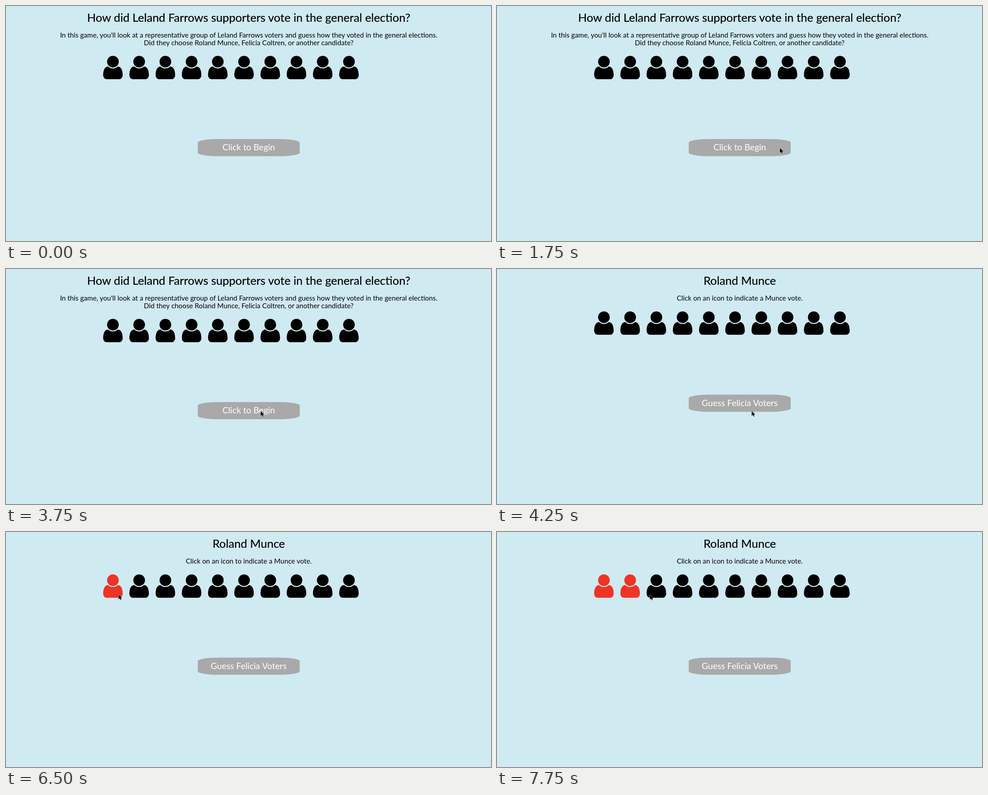
Animation, 1075 px wide and 521 px high, one loop 8 s. Source, as an HTML page:

```html
<!DOCTYPE html>
<html lang="en">
<head>
<meta charset="utf-8">
<title>Voter guessing game</title>
<style>
html, body { margin: 0; width: 100%; height: 100%; overflow: hidden; background: #d0eaf1; }
svg { display: block; width: 1075px; height: 521px; }
text { font-family: Lato, "Open Sans", sans-serif; text-anchor: middle; }
.title { font-size: 25.5px; stroke: #000; stroke-width: .2px; }
.body { font-size: 15.3px; }
.label { font-size: 19.3px; fill: #fff; }
</style>
</head>
<body>
<svg viewBox="0 0 1075 521">
  <defs>
    <g id="person">
      <circle cy="12.9" r="12.9"/>
      <path d="M-10.6 23.7Q-6.1 28 0 28T10.6 23.7C19.2 23.7 21.6 34.1 21.6 42.8C21.6 47.6 18.3 51.8 14.4 51.8H-14.4C-18.3 51.8-21.6 47.6-21.6 42.8C-21.6 34.1-19.2 23.7-10.6 23.7Z"/>
    </g>
  </defs>
  <text id="title" class="title" x="538" y="35.3"></text>
  <text id="line1" class="body" x="538" y="70"></text>
  <text id="line2" class="body" x="538" y="86.5"></text>
  <g id="lower">
    <g id="people"></g>
    <rect x="425" y="295" width="226" height="38" rx="45.2" ry="7.6" fill="#a9a9a9"/>
    <text id="label" class="label" x="538" y="320.3"></text>
  </g>
  <path id="cursor" d="M0 0V11L2.6 8.6L4.4 12.6L6.2 11.8L4.5 8H8Z" stroke="#fff" stroke-width="1" paint-order="stroke"/>
</svg>
<script>
const LOOP = 8000;
const STEP = 250;
const PEOPLE = 10;
const el = id => document.getElementById(id);

const intro = {
  shift: 0,
  title: "How did Leland Farrows supporters vote in the general election?",
  line1: "In this game, you'll look at a representative group of Leland Farrows voters and guess how they voted in the general elections.",
  line2: "Did they choose Roland Munce, Felicia Coltren, or another candidate?",
  label: "Click to Begin"
};
const guess = {
  shift: -16.5,
  title: "Roland Munce",
  line1: "Click on an icon to indicate a Munce vote.",
  line2: "",
  label: "Guess Felicia Voters"
};
const guessStart = 4250;
const firstClick = 6500;
const clickGap = 750;
const clickCount = 2;

// The pointer enters, then glides to each place and rests there.
const entry = { at: 500, x: 980, y: 17 };
const moves = [
  { from: 500, to: 750, x: 948, y: 124 },
  { from: 750, to: 1250, x: 707, y: 263 },
  { from: 1250, to: 1750, x: 627, y: 314.7 },
  { from: 2250, to: 2750, x: 564.5, y: 314.7 },
  { from: 5250, to: 5500, x: 363, y: 214.3 },
  { from: 5750, to: 6250, x: 249.5, y: 138.5 },
  { from: 6750, to: 7000, x: 290, y: 138.5 },
  { from: 7250, to: 7750, x: 339, y: 139 }
];

const easeOut = p => 1 - (1 - p) ** 3.5;

function pointerAt(t) {
  let { x, y } = entry;
  for (const move of moves) {
    const p = (t - move.from) / (move.to - move.from);
    const k = easeOut(Math.min(1, Math.max(0, p)));
    x += (move.x - x) * k;
    y += (move.y - y) * k;
  }
  return { x, y };
}

const people = Array.from({ length: PEOPLE }, (_, i) => {
  const use = document.createElementNS("http://www.w3.org/2000/svg", "use");
  use.setAttribute("href", "#person");
  use.setAttribute("x", 237 + i * 58.13);
  use.setAttribute("y", 110.5);
  return el("people").appendChild(use);
});

function render(time) {
  const t = Math.floor(time / STEP) * STEP;
  const screen = t < guessStart ? intro : guess;
  for (const id of ["title", "line1", "line2", "label"]) el(id).textContent = screen[id];
  el("lower").setAttribute("transform", `translate(0 ${screen.shift})`);

  people.forEach((person, i) => {
    const clicked = i < clickCount && t >= firstClick + i * clickGap;
    person.setAttribute("fill", clicked ? "#ef3324" : "#000");
  });

  const { x, y } = pointerAt(t);
  el("cursor").setAttribute("visibility", t < entry.at ? "hidden" : "visible");
  el("cursor").setAttribute("transform", `translate(${x} ${y})`);
}

const began = performance.now();
function tick() {
  render((performance.now() - began) % LOOP);
  requestAnimationFrame(tick);
}
tick();
</script>
</body>
</html>
```
